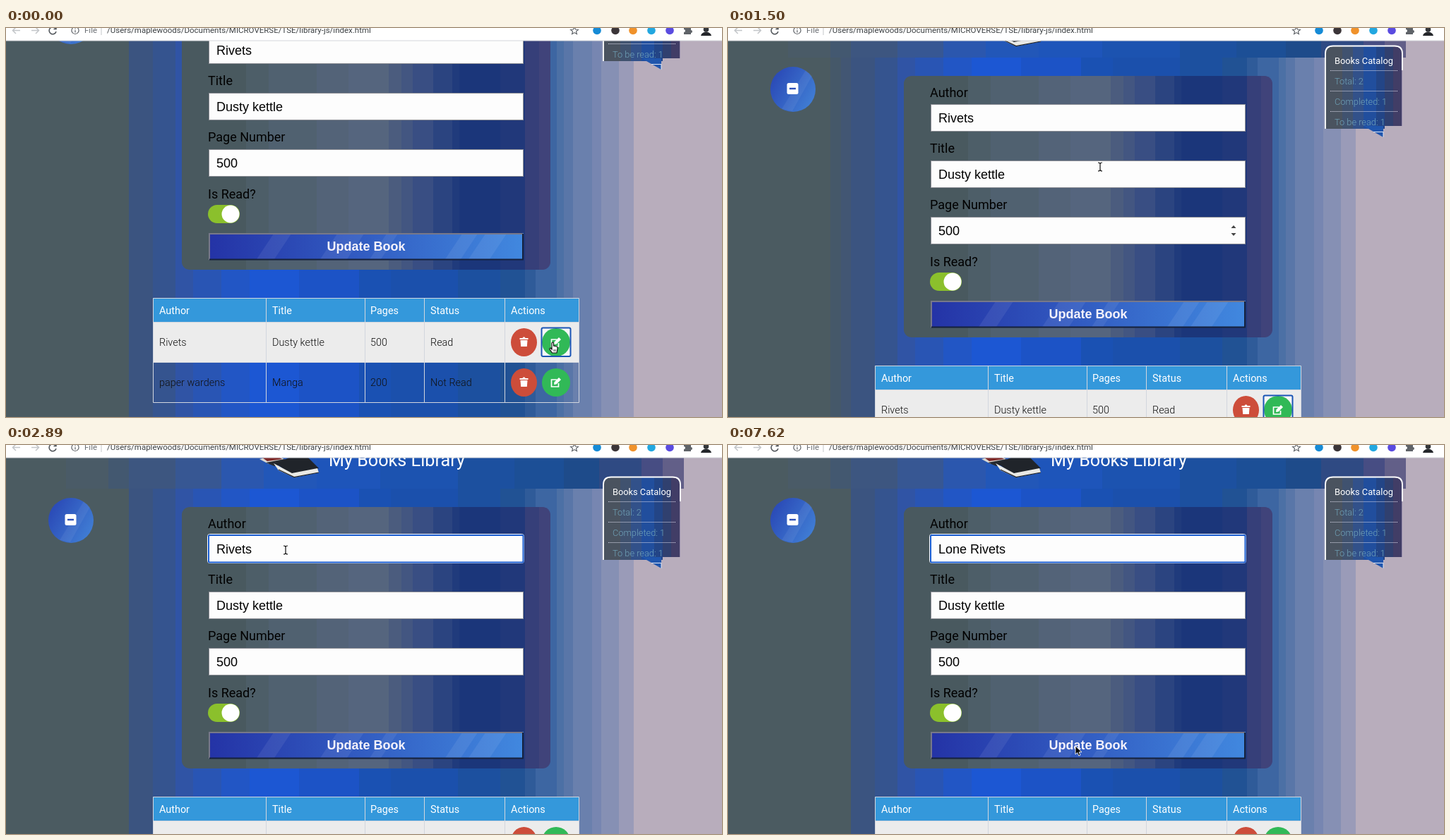
These frames come from a looping animation (1014 px wide and 552 px high, 8000 ms). An HTML page:

```html
<!DOCTYPE html>
<html lang="en">
<head>
<meta charset="utf-8">
<title>My Books Library</title>
<style>
  html, body { margin: 0; width: 100%; height: 100%; overflow: hidden; background: #4b5b61; }
  svg { display: block; width: 100vw; height: 100vh; }
  text { font-family: Roboto, sans-serif; white-space: pre; }
  .field { font: 18px "Liberation Sans", Arial, sans-serif; }
  .label { font-size: 18px; }
  .head { font-size: 14.4px; fill: #fff; }
  .cell { font-size: 14.4px; font-weight: 300; fill: #111; }
  .note { font-size: 12.8px; font-weight: 300; fill: #70a3b9; }
</style>
</head>
<body>
<svg id="stage" viewBox="0 0 1014 552" preserveAspectRatio="none"></svg>
<script>
const LOOP = 8000;
const stage = document.getElementById('stage');

const rect = (x, y, w, h, fill, extra = '') =>
  `<rect x="${x}" y="${y}" width="${w}" height="${h}" fill="${fill}" ${extra}/>`;
const path = (d, fill, extra = '') => `<path d="${d}" fill="${fill}" ${extra}/>`;
const dot = (x, y, r, fill) => `<circle cx="${x}" cy="${y}" r="${r}" fill="${fill}"/>`;
const text = (x, y, s, cls, extra = '') => `<text x="${x}" y="${y}" class="${cls}" ${extra}>${s}</text>`;
const line = (d, color, width = 1, extra = '') =>
  `<path d="${d}" fill="none" stroke="${color}" stroke-width="${width}" ${extra}/>`;

// "x colour x colour ... end" becomes flat vertical bands
function bands(spec, y, h) {
  const s = spec.split(' ');
  let out = '';
  for (let i = 0; i + 2 < s.length; i += 2) out += rect(s[i], y, s[i + 2] - s[i], h, '#' + s[i + 1]);
  return `<g shape-rendering="crispEdges">${out}</g>`;
}

const PAGE = '0 4b5b61 145 455869 160 425673 174 3b5480 208 35548f 240 3054a5 265 2955b4 ' +
  '305 2256c5 345 1c57d3 415 1c53c6 500 1a51b3 545 1b50ac 640 1c509f 700 215294 735 2f5b99 ' +
  '750 3d66a2 780 4c70a5 790 5976a8 803 6a80ad 830 7786b1 843 8690b4 868 9a9bb8 889 b8adbc 1014';
const BANNER = '85 4a5b67 145 435870 174 3d5680 240 375793 305 2b57ae 365 2257b8 440 1e55ba ' +
  '530 1c53b0 640 1c509f 720 1c4f96 790 1e4b8a 840 2f4a83 900 474d83 930 625f88 960';
const PANEL = '249 49595f 340 4d5e68 372 506170 440 536378 485 55657e 542 4b5c7e 560 435681 ' +
  '576 394e83 605 2b4480 632 203b7c 642 1b367a 700 21387a 735 363f79 755 40437a 771';
const NOTE = '846 4a535f 870 40526f 885 32518a 900 214e9d 918 234586 930 30406f 942 413d66 954';

const grad = (id, from, to, y2 = 0) => `<linearGradient id="${id}" x2="1" y2="${y2}">
  <stop stop-color="${from}"/><stop offset="1" stop-color="${to}"/></linearGradient>`;

const input = (y, value, id) =>
  rect(287.5, y + .5, 445, 38, '#fdfdfd', 'stroke="#8b8d94"') +
  text(298, y + 26, value, 'field', `id="${id}"`);

function form() {
  let shine = '';
  for (const [x, w] of [[355, 25], [445, 38], [515, 16], [622, 22], [655, 30]])
    shine += path(`M${x} 444h${w}l24-36h${-w}z`, '#fff', 'opacity=".07"');
  return `<g clip-path="url(#panelClip)">${bands(PANEL, 88, 371)}</g>` +
    text(286, 118, 'Author', 'label') + input(128, '', 'author') +
    text(286, 197, 'Title', 'label') + input(208, 'Dusty kettle', 'title') +
    text(286, 277, 'Page Number', 'label') + input(288, '500', 'pages') +
    `<g id="spinner">${path('M712.5 304l3.5-4 3.5 4zM712.5 311l3.5 4 3.5-4z', '#444')}</g>` +
    `<g id="ring">${rect(285.5, 126.5, 448, 41, 'none', 'rx="3" stroke="#fff"')}
      ${rect(287, 128, 445.5, 38.5, 'none', 'rx="1.5" stroke="#175bd0" stroke-width="2"')}</g>` +
    rect(0, 138, 1, 20, '#000', 'id="caret"') +
    text(286, 357.5, 'Is Read?', 'label') +
    rect(286, 367, 45, 26, '#8bc02c', 'rx="13"') + dot(318, 380, 12.5, '#fff') +
    rect(287, 407, 446, 38, 'url(#update)') + shine +
    line('M288 445V408H732', '#77788a', 2) + line('M288 444.5H732V408', '#15213c', 2) +
    text(510, 431.5, 'Update Book', 'field', 'text-anchor="middle" fill="#f5f2fb" style="font-weight:bold"');
}

const actions = y =>
  `<ellipse cx="733.5" cy="${y}" rx="18.5" ry="20" fill="#cd4d3a"/>` +
  path(`M727.5 ${y - 6}h4l1-1.5h2l1 1.5h4v2h-12zM728.5 ${y - 3}h10l-.7 9h-8.6z`, '#fff') +
  dot(779, y, 20, '#31b957') +
  line(`M780 ${y - 4}h-7.5v10h10v-5`, '#fff', 1.7) +
  path(`M776 ${y + 3}l.5-3.5 6.5-6.5 3 3-6.500 6.500z`, '#fff');

function table() {
  const cols = [217, 377, 516, 601, 715];
  const row = (y, cls, cells) => cells.map((c, i) => text(cols[i], y, c, cls)).join('');
  return rect(208, 499, 604, 34, '#3498db') + rect(208, 533, 604, 57, '#ececec') +
    `<g id="editRing">${rect(758, 541, 42, 42, '#f7f7f7')}</g>` +
    line('M208.500 499.500H811.500V647.500H208.500ZM208 533.500H812M208 590.500H812' +
      'M368.500 499V648M508.500 499V648M592.500 499V648M706.500 499V648', '#d2d6de') +
    row(521.5, 'head', ['Author', 'Title', 'Pages', 'Status', 'Actions']) +
    row(567, 'cell', ['Rivets', 'Dusty kettle', '500', 'Read']) +
    row(624, 'cell', ['paper wardens', 'Manga', '200', 'Not Read']) +
    actions(562) + actions(619) +
    rect(758.5, 541.5, 41, 40.5, 'none', 'id="editEdge" rx="2" stroke="#1a55b5" stroke-width="2"');
}

function catalog() {
  const rule = (y, x1 = 853, x2 = 948) => line(`M${x1} ${y}.500H${x2}`, '#dde', 1, 'stroke-dasharray="1 1"');
  return `<g clip-path="url(#noteClip)">${bands(NOTE, 45, 118)}</g>` +
    path('M900 159L928 175V159Z', '#2056ad') + line('M914 167.500H928V175', '#dfe6f5') +
    line('M846 163V56Q846 45.500 857 45.500H944Q955 45.500 955 56V80', '#fff', 1.8) +
    line('M954.500 80V159', '#8c83a5', .8) +
    text(859, 71, 'Books Catalog', 'note', 'style="fill:#fff;font-weight:400"') +
    text(859, 100, 'Total: 2', 'note') + text(859, 129, 'Completed: 1', 'note') +
    text(859, 158, 'To be read: 1', 'note') + rule(80) + rule(109) + rule(138);
}

const banner = () => bands(BANNER, 0, 62) +
  path('M359 20L384 14 400 24 372 27Z', '#d8d8d4') + path('M363 18l20-3 8 5-21 3z', '#7e2928') +
  path('M368 25l26-5 8 6-22 4z', '#262a30') +
  path('M382 26L420 10 443 33 405 43Z', '#20242a') + path('M379 26L405 40 441 33 443 39 408 46 386 36Z', '#e9e9e5') +
  line('M386 35L408 45.500 443 39', '#222', 1.2) +
  text(457, 30, 'My Books Library', '', 'font-size="25.2" fill="#fff"');

const minus = () => dot(92, 107, 32, 'url(#round)') +
  path('M76 135L110 80 119 88 91 138Z', '#fff', 'opacity=".06"') +
  rect(83.500, 98, 16, 16, '#fff', 'rx="2.500"') + rect(87, 104.800, 9, 2.400, '#2d4fb8');

function toolbar() {
  const icons = [[837, '#168bd6'], [863, '#3b3538'], [888, '#f0922b'], [914, '#22a7e0'], [940, '#5a4be0']];
  const mono = 'font-size="11.5" fill="#3c4043"';
  return rect(0, 0, 1014, 18, '#fff') + rect(0, 17.5, 1014, 1, '#d5d7db') +
    line('M20 3.500H9.500M14 -1L9.500 3.500 14 8M36 3.500H46.500M42 -1L46.500 3.500 42 8', '#c3c6c9', 1.5) +
    line('M70 .500A5 5 0 1 0 71 5M71 -2V1.500H67.500', '#55595e', 1.6) +
    line('M98 -1.500a5 5 0 1 0 .01 0M98 3v3.500M98 .500v1.300', '#5f6368', 1.2) +
    text(111, 7, 'File', '', 'font-size="11.5" fill="#6b6f74"') + rect(134.5, -2, 1, 12, '#c4c7ca') +
    text(143, 7, '/Users/maplewoods/Documents/MICROVERSE/TSE/library-js/index.html', '', mono) +
    line('M805 -1.500l1.600 3.500 3.800.400-2.900 2.500.900 3.700-3.400-2-3.400 2 .900-3.700-2.900-2.500 3.800-.400z', '#5f6368', 1.2) +
    icons.map(([x, c]) => dot(x, 3.5, 5.8, c)).join('') +
    path('M960 -1h3.500a2 2 0 0 1 4 0h2.500v4a2 2 0 0 1 0 4v2h-10v-3a2 2 0 0 0 0-4z', '#5f6368') +
    dot(991.5, 2, 3.8, '#34363a') + path('M984 11Q985 6 991.500 5.500 998 6 999 11Z', '#25272b');
}

const pointers = {
  beam: line('M-3 -6Q0 -6 0 -4 0 -6 3 -6M0 -5V5M-3 6Q0 6 0 4 0 6 3 6', '#111', 1.2),
  arrow: path('M0 0V12L2.800 9.500 4.800 14 7 13 5 8.800H9Z', '#000', 'stroke="#fff" stroke-width=".9"'),
  hand: path('M-2 0V-5.500Q-2 -7-.700-7 .500-7 .500-5.500V-2L5 -1Q6.500 -.500 6 2L5 8H-1.500L-5 3Q-5.500 1-3.500 1.500L-2 3Z',
    '#fff', 'stroke="#111" stroke-width="1.200"') + line('M1 3V6M3 3V6', '#111', .8)
};

stage.innerHTML = `<defs>
  ${grad('update', '#2433a6', '#4188df')}${grad('round', '#2742b2', '#3f7bd3', .6)}
  <clipPath id="panelClip"><rect x="249" y="88" width="522" height="371" rx="11"/></clipPath>
  <clipPath id="noteClip"><path d="M846 163V56Q846 45 857 45H944Q955 45 955 56V159H930V163Z"/></clipPath></defs>
  ${bands(PAGE, 0, 552)}
  ${rect(145, 0, 29, 552, '#4b5b61', 'id="settled"')}
  <g id="page">${banner() + minus() + form() + table() + catalog()}</g>
  ${toolbar()}
  <g id="pointer">${Object.entries(pointers).map(([k, v]) => `<g id="${k}">${v}</g>`).join('')}</g>`;

const el = id => document.getElementById(id);
const show = (id, on) => { el(id).style.display = on ? '' : 'none'; };
const at = (steps, t) => steps.findLast(s => s[0] <= t).slice(1);

const scroll = [[0, -116], [1350, -110], [1500, -20], [1640, -8], [1860, 0]];
const mouse = [
  [0, 775, 453, 'hand'], [1050, 705, 362, 'arrow'], [1200, 560, 232, 'arrow'], [1350, 527, 197, 'beam'],
  [2030, 405, 148, 'beam'], [2170, 396, 149, 'beam'], [6460, 398, 158, 'beam'], [6610, 405, 188, 'arrow'],
  [6750, 415, 230, 'beam'], [6890, 431, 272, 'arrow'], [7040, 450, 315, 'beam'],
  [7190, 471, 368, 'arrow'], [7330, 486, 419, 'arrow'], [7480, 490, 425, 'arrow'], [7620, 492, 427, 'arrow']
];
const typed = [[0, ''], [4970, 'L'], [5260, 'Lo'], [5560, 'Lon'], [5860, 'Lone'], [6310, 'Lone ']];
const caretOn = [[0, false], [2440, true], [2890, false], [3480, true], [3930, false], [4220, true],
  [4670, false], [4970, true], [6890, false], [7330, true], [7620, false]];

const ruler = document.createElement('canvas').getContext('2d');
ruler.font = '18px "Liberation Sans", Arial, sans-serif';

function draw() {
  const t = performance.now() % LOOP;
  const [y] = at(scroll, t), [mx, my, kind] = at(mouse, t), [prefix] = at(typed, t);
  el('page').setAttribute('transform', `translate(0 ${y})`);
  el('pointer').setAttribute('transform', `translate(${mx} ${my})`);
  for (const k in pointers) show(k, k === kind);
  el('author').textContent = prefix + 'Rivets';
  const before = t < 4220 ? 'Rivets' : prefix;
  el('caret').setAttribute('x', Math.round(298 + ruler.measureText(before).width));
  show('caret', at(caretOn, t)[0]);
  show('ring', t >= 2440);
  show('editRing', t < 2440);
  show('editEdge', t < 2440);
  show('spinner', (t >= 1350 && t < 2030) || (t >= 7040 && t < 7190));
  show('settled', t < 1350 || t >= 1860);
  requestAnimationFrame(draw);
}
draw();
</script>
</body>
</html>
```
